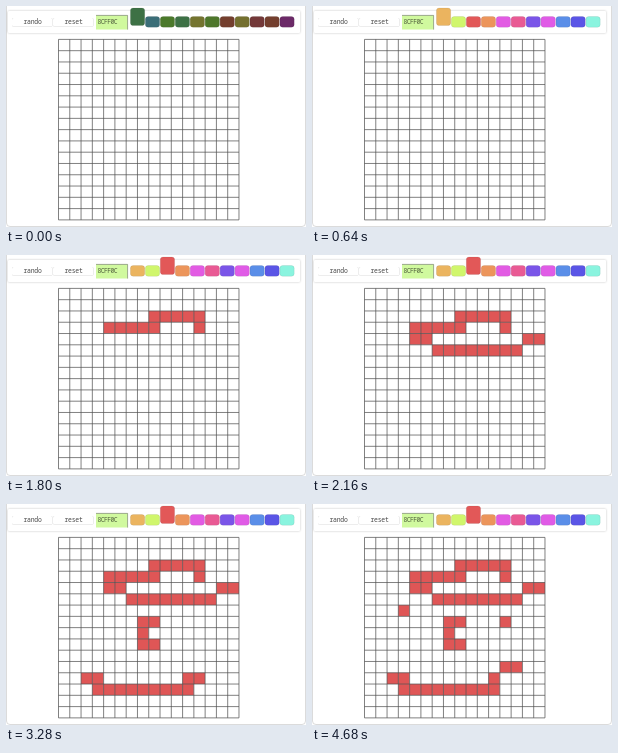
An HTML page that plays this animation: 300 by 221 pixels, repeating every 4.72 s.

```html
<!DOCTYPE html>
<html lang="en">
<head>
<meta charset="utf-8">
<title>Pixel painter</title>
<style>
  html, body { margin: 0; width: 100%; height: 100%; overflow: hidden; background: #fff; }
  svg { display: block; width: 300px; height: 221px; }
  text { font-family: "Noto Sans Mono", "DejaVu Sans Mono", monospace; fill: #484848; }
  .bar { fill: #fff; filter: drop-shadow(0 .8px .9px rgba(0, 0, 0, .24)); }
  .button { fill: #fff; filter: drop-shadow(0 .4px .6px rgba(0, 0, 0, .28)); }
  .label { font-size: 6.4px; letter-spacing: -.2px; text-anchor: middle; }
  .code { font-size: 6.4px; letter-spacing: -.62px; fill: #53633f; }
  .swatch { stroke: rgba(0, 0, 0, .1); stroke-width: .7; }
  .grid { fill: none; stroke: #505050; stroke-width: .72; }
</style>
</head>
<body>
<svg id="stage" viewBox="0 0 300 221"></svg>
<script>
const LOOP = 4720;
const COLS = 16, PITCH = 11.28, LEFT = 52.5, TOP = 33.4, SIZE = COLS * PITCH;
const INK = '#df5656';
const DARK = ['#3d7145', '#3b6e78', '#4b792b', '#3d7145', '#74742f', '#4e772b',
  '#743f2e', '#74702f', '#743939', '#743f2e', '#6c2a68'];
const BRIGHT = ['#ebb45f', '#d0f66c', '#e25858', '#ec955b', '#e25be3', '#e95a94',
  '#7a55e8', '#e05be6', '#5a8ee8', '#5a55e6', '#8af4df'];

// Pen strokes: start and end time, then the corner cells [column, row]
const STROKES = [
  [1500, 1800, [4, 3], [8, 3], [8, 2], [12, 2], [12, 3]],
  [1840, 2130, [15, 4], [14, 4], [13, 5], [6, 5], [5, 4], [4, 4]],
  [2440, 2780, [8, 7], [7, 7], [7, 9], [8, 9]],
  [2920, 3260, [2, 12], [3, 12], [3, 13], [11, 13], [11, 12], [12, 12]],
  [3640, 3720, [12, 11], [13, 11]],
  [3900, 3900, [3, 6]],
  [4280, 4280, [12, 7]]
];
const ERASED = { col: 12, row: 12, at: 3560 };

const stage = document.getElementById('stage');

function add(tag, attrs, text) {
  const el = document.createElementNS('http://www.w3.org/2000/svg', tag);
  for (const key in attrs) el.setAttribute(key, attrs[key]);
  if (text) el.textContent = text;
  return stage.appendChild(el);
}

const box = (x, y, width, height, more) => add('rect', { x, y, width, height, ...more });
const line = (d, stroke, width) => add('path', { d, stroke, fill: 'none', 'stroke-width': width });
const clamp = v => Math.max(0, Math.min(1, v));
const ease = v => v * v * (3 - 2 * v);
const channels = hex => [1, 3, 5].map(i => parseInt(hex.slice(i, i + 2), 16));

function mix(a, b, k) {
  const to = channels(b);
  return `rgb(${channels(a).map((v, i) => Math.round(v + (to[i] - v) * k))})`;
}

// All cells on the way through the corners
function trace(corners) {
  const path = [corners[0]];
  for (const [col, row] of corners.slice(1)) {
    let [x, y] = path[path.length - 1];
    while (x !== col || y !== row) {
      x += Math.sign(col - x);
      y += Math.sign(row - y);
      path.push([x, y]);
    }
  }
  return path;
}

line('M.5 0V217Q.5 220.5 4 220.5H296Q299.5 220.5 299.5 217V0', '#ccc', .7);

box(2, 5, 292, 22, { rx: 1, class: 'bar' });
[['rando', 6], ['reset', 47]].forEach(([name, x]) => {
  box(x, 12, 40.5, 8.5, { rx: 1.5, class: 'button' });
  add('text', { x: x + 20.5, y: 18.2, class: 'label' }, name);
});

box(90, 9, 32, 14.5, { fill: '#d0f99e' });
line('M90 9.4H121.6V23.5', '#8f958a', .8);
add('text', { x: 91.6, y: 18.4, class: 'code' }, '8CFF0C');

const swatches = DARK.map((_, i) => box(124.4 + i * 14.95, 10.5, 14.3, 10.8, { rx: 2.8, class: 'swatch' }));

const cells = [];
for (let i = 0; i < COLS * COLS; i++) {
  const col = i % COLS, row = Math.floor(i / COLS);
  const el = box(LEFT + col * PITCH, TOP + row * PITCH, PITCH, PITCH);
  cells.push({ el, on: Infinity, off: Infinity });
}
const cellAt = (col, row) => cells[row * COLS + col];

let grid = '';
for (let i = 0; i <= COLS; i++) {
  grid += `M${LEFT + i * PITCH} ${TOP}v${SIZE}M${LEFT} ${TOP + i * PITCH}h${SIZE}`;
}
add('path', { d: grid, class: 'grid' });

for (const [start, end, ...corners] of STROKES) {
  const path = trace(corners);
  path.forEach(([col, row], i) => {
    cellAt(col, row).on = start + (end - start) * i / Math.max(1, path.length - 1);
  });
}
cellAt(ERASED.col, ERASED.row).off = ERASED.at;

function draw(t) {
  const fade = ease(clamp((t - 40) / 480));
  const move = ease(clamp((t - 840) / 160));
  swatches.forEach((el, i) => {
    const lift = i === 0 ? 1 - move : i === 2 ? move : 0;
    el.setAttribute('fill', mix(DARK[i], BRIGHT[i], fade));
    el.setAttribute('y', 10.5 - 8.6 * lift);
    el.setAttribute('height', 10.8 + 6.8 * lift);
  });
  for (const { el, on, off } of cells) {
    el.setAttribute('fill', t >= on && t < off ? INK : '#fff');
  }
}

const begin = performance.now();
function tick() {
  draw((performance.now() - begin) % LOOP);
  requestAnimationFrame(tick);
}
tick();
</script>
</body>
</html>
```
